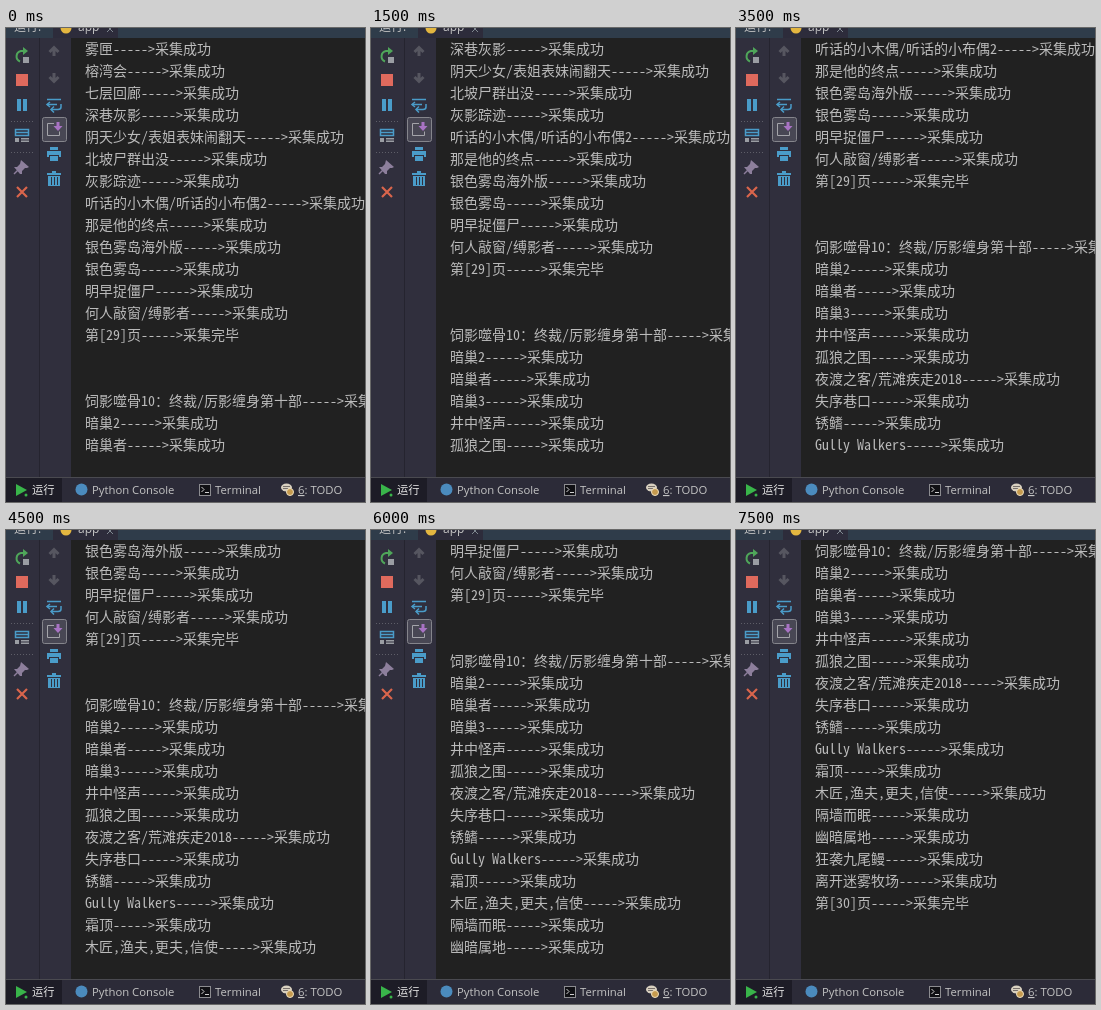
These frames come from a looping animation (359 by 474 pixels, 8000 ms). An HTML page:

```html
<!DOCTYPE html>
<html lang="zh-CN">
<head>
<meta charset="utf-8">
<style>
html, body { margin: 0; width: 100%; height: 100%; overflow: hidden; background: #212121; }
svg { position: absolute; left: 0; top: 0; }
svg text { font: 11.3px "Open Sans", "Noto Sans CJK SC", sans-serif; fill: #c4c4c4; }
#console { position: absolute; left: 79px; top: 9px; width: 280px; height: 418px; overflow: hidden; }
#lines { font: 14px/22px "Noto Sans Mono CJK SC", "Noto Sans CJK SC", monospace; color: #bbb; white-space: pre; }
</style>
</head>
<body>
<svg width="359" height="474" viewBox="0 0 359 474" fill="none">
  <!-- panels -->
  <path fill="#302f3d" d="M0 0h65v449H0z"/>
  <path fill="#2f3c4a" d="M0 0h359v10H0z"/>
  <path fill="#2d2c3b" d="M47 0h65v10H47z"/>
  <path stroke="#25242f" d="M33.5 10v439"/>
  <path fill="#2c2b38" d="M0 449h359v25H0z"/>
  <path fill="#1d1c26" d="M0 450h56v24H0z"/>
  <path stroke="#4a4a50" d="M0 449.5h359"/>

  <!-- header -->
  <text x="8" y="3" style="font-size:12px">运行:</text>
  <circle cx="60" cy="0" r="5.5" fill="#e3b640"/>
  <text x="72" y="3" style="font-size:12px">app</text>
  <path stroke="#808890" d="M101-2l6 6m0-6l-6 6"/>

  <!-- run column -->
  <g stroke-width="2">
    <path stroke="#4fa65a" d="M14 33.500a5.500 5.500 0 0 1 1-10.500h4"/>
    <path fill="#4fa65a" d="M17 19l5 4-5 4z"/>
    <path fill="#9a9da3" d="M17 29h6v6h-6z"/>
    <path fill="#df6a5d" d="M10 46h12v12H10z"/>
    <path fill="#4a9cc9" d="M11 71h4v12h-4zM17 71h4v12h-4z"/>
    <path stroke="#4a9cc9" stroke-width="1.500" d="M9.500 101.500h13v6h-13zM9 104.500h14"/>
    <path fill="#9a9da3" d="M9 110h4v4H9zM15 110h8v1.500h-8zM15 112.500h8v1.500h-8z"/>
    <path fill="#8d7f9c" d="M15 132l8 7-2 1-2 0-3 3 0 3-2 0-6-7 3 0 3-3z"/>
    <path stroke="#8d7f9c" stroke-width="1.500" d="M12 142l-4 4"/>
    <path stroke="#d9654c" stroke-width="2.200" d="M11 159l10 10m0-10l-10 10"/>
  </g>
  <path stroke="#5e5e68" stroke-dasharray="1 2" d="M5 93.500h23M5 124.500h23"/>

  <!-- console column -->
  <path stroke="#565660" stroke-width="3" d="M48 28v-8m-4.500 4l4.500-4.500 4.500 4.500M48 45v8m-4.500-4l4.500 4.500 4.500-4.500"/>
  <g stroke="#4a9cc9" stroke-width="1.500">
    <path d="M41 71.500h14M41 76.500h10M45 81.500h7q3 0 3-2.500v-3"/>
    <path d="M48 78.500l-3 3 3 3M44 74l-3 2.500 3 2.500"/>
  </g>
  <rect x="36.500" y="89.500" width="24" height="24" rx="2" fill="#484754" stroke="#85858c"/>
  <path stroke="#a4a4aa" d="M48 95.500h-6.500v12h12v-4"/>
  <path stroke="#a873c4" stroke-width="3" d="M52 94v5"/>
  <path fill="#a873c4" d="M47.500 98h9l-4.500 5z"/>
  <path fill="#4a9cc9" d="M44 119h8v3h-8zM41 123h14v6h-2v-2H43v2h-2zM44 128h8v5h-8z"/>
  <path fill="#4a9cc9" d="M41 145h14v2H41zM46 143h4v2h-4zM42 148h12v10H42z"/>
  <path stroke="#302f3d" d="M45.500 149v8M48.500 149v8M51.500 149v8"/>

  <!-- tool window bar -->
  <path fill="#39b54a" d="M10 456l11 6-11 6z"/>
  <circle cx="20" cy="467" r="1.500" fill="#39b54a"/>
  <text x="26" y="466" style="fill:#e2e2e2">运行</text>
  <circle cx="75.500" cy="461.500" r="6" fill="#4b8bbe"/>
  <text x="86" y="466">Python Console</text>
  <rect x="193.500" y="456.500" width="11" height="11" fill="#101014" stroke="#8c8c90"/>
  <path stroke="#d0d0d0" d="M195.500 459l2.500 2.500-2.500 2.500M199 464.500h4"/>
  <text x="209" y="466">Terminal</text>
  <ellipse cx="280.500" cy="459.500" rx="5.500" ry="4" fill="#d8d0c0"/>
  <path stroke="#77706a" d="M277 458.500h7M277 460.500h5"/>
  <circle cx="284" cy="464" r="3.500" fill="#c59a4e" stroke="#eee0c0"/>
  <text x="292" y="466"><tspan text-decoration="underline">6</tspan>: TODO</text>
</svg>
<div id="console"><div id="lines"></div></div>

<script>
const ROW = 22, STEP = 500, LOOP = 8000;

// "#n" ends a page and is followed by two blank rows
const log = `雾匣
榕湾会
七层回廊
深巷灰影
阴天少女/表姐表妹闹翻天
北坡尸群出没
灰影踪迹
听话的小木偶/听话的小布偶2
那是他的终点
银色雾岛海外版
银色雾岛
明早捉僵尸
何人敲窗/缚影者
#29
饲影噬骨10：终裁/厉影缠身第十部
暗巢2
暗巢者
暗巢3
井中怪声
孤狼之围
夜渡之客/荒滩疾走2018
失序巷口
锈鳍
Gully Walkers
霜顶
木匠,渔夫,更夫,信使
隔墙而眠
幽暗属地
狂袭九尾鳗
离开迷雾牧场
#30`.split('\n').map(title => title[0] === '#'
  ? `第[${title.slice(1)}]页----->采集完毕\n\n`
  : `${title}----->采集成功`);

const lines = document.getElementById('lines');
lines.textContent = log.join('\n');

// One new row per step, a pause at step 10, three rows at once at the page end
function scrolledRows(time) {
  const step = Math.floor(time % LOOP / STEP);
  return step - (step >= 10) + 2 * (step === 15);
}

const start = performance.now();
function draw() {
  const rows = scrolledRows(performance.now() - start);
  lines.style.transform = `translateY(${-rows * ROW}px)`;
  requestAnimationFrame(draw);
}
draw();
</script>
</body>
</html>
```
